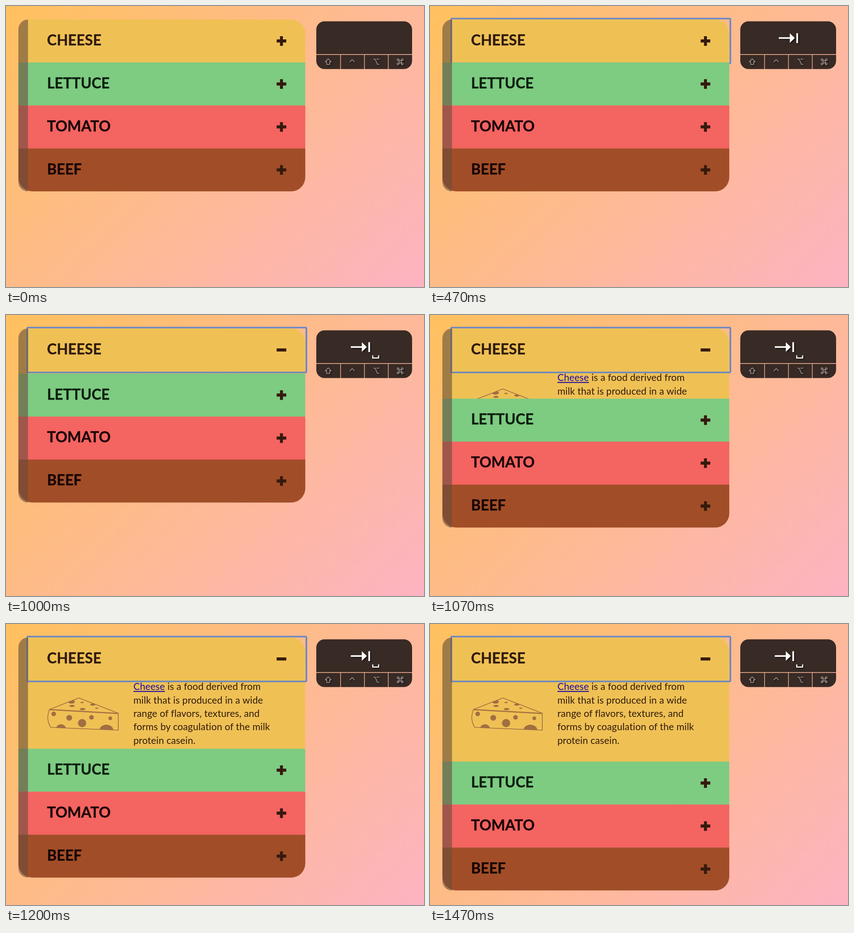
An HTML page that plays this animation: 912 px wide and 614 px high, repeating every 1540 ms.

```html
<!DOCTYPE html>
<html lang="en">
<head>
<meta charset="utf-8">
<style>
  html, body { margin: 0; width: 100%; height: 100%; overflow: hidden; }
  body { background: linear-gradient(135deg, #ffc15e, #fdb3c2); }
  svg { display: block; width: 912px; height: 614px; }
  text { font-family: Lato, "Open Sans", sans-serif; }
  .head { font-size: 32px; font-weight: 700; stroke-width: .4; stroke-linejoin: round; }
  .body { font-size: 21px; letter-spacing: .1px; fill: #331a0c; }
  .link { fill: #1d0aa3; text-decoration: underline; }
  .line { fill: none; stroke-linejoin: round; }
  .shade { filter: drop-shadow(2px 2px 1px #0009); }
</style>
</head>
<body>
<svg viewBox="0 0 912 614">
  <defs>
    <clipPath id="card"><rect id="cardBox" x="27" y="29.5" width="626" height="375.6" rx="31"/></clipPath>
    <clipPath id="pad"><rect x="677" y="33.5" width="209" height="104.3" rx="18"/></clipPath>
    <clipPath id="front"><path d="M95 187L245 196V232L98 226Q86 208 95 187Z"/></clipPath>
    <clipPath id="top"><path d="M94 187L159 161.5L245 195Z"/></clipPath>
  </defs>

  <g clip-path="url(#card)">
    <rect x="27" y="29" width="626" height="275" fill="#efc155"/>
    <g id="cheese"></g>
    <g id="panel">
      <g fill="#a06f42">
        <g clip-path="url(#top)">
          <ellipse cx="143" cy="170" rx="7.5" ry="4"/><ellipse cx="166" cy="171.5" rx="3.5" ry="1.4"/>
          <ellipse cx="189.5" cy="176" rx="5.5" ry="2.6"/><ellipse cx="144" cy="179" rx="6" ry="2.2"/>
          <ellipse cx="167" cy="186" rx="6" ry="2.5"/><ellipse cx="198" cy="184" rx="3.5" ry="1.3"/>
        </g>
        <g clip-path="url(#front)">
          <circle cx="104" cy="196.5" r="5"/><circle cx="138" cy="205" r="6.3"/><circle cx="166" cy="216.5" r="9"/>
          <circle cx="186.5" cy="204" r="5"/><circle cx="227.5" cy="206" r="4"/>
          <ellipse cx="120" cy="228" rx="10.5" ry="9"/><ellipse cx="219" cy="232" rx="15" ry="12"/>
        </g>
      </g>
      <g class="line" stroke="#a06f42" stroke-width="1.6">
        <path d="M94 187L159 161.5L245 195V232L98 226Q86 208 95 187"/>
        <path d="M94 187L245 195.5" stroke-width="2.6"/>
      </g>
      <g class="body">
        <text x="278" y="144.3"><tspan class="link">Cheese</tspan> is a food derived from</text>
        <text x="278" y="173.6">milk that is produced in a wide</text>
        <text x="278" y="202.9">range of flavors, textures, and</text>
        <text x="278" y="232.2">forms by coagulation of the milk</text>
        <text x="278" y="261.5">protein casein.</text>
      </g>
    </g>
  </g>

  <g id="ring" class="line" stroke="#5580d0">
    <rect x="46.5" y="27.5" width="608.8" height="98" rx="1.5" stroke-width="4.2" opacity=".45"/>
    <rect x="46.5" y="27.5" width="608.8" height="98" rx="1.5" stroke-width="2.6" opacity=".85"/>
  </g>

  <g clip-path="url(#card)"><g id="lower"></g></g>
  <path id="strip" fill="#6b4d3d" fill-opacity=".6"/>

  <g clip-path="url(#pad)" fill="#382a25">
    <path d="M677 33H886V105.3H677ZM677 106.8H729.3V138H677ZM730.6 106.8H781.4V138H730.6ZM782.7 106.8H833.4V138H782.7ZM834.7 106.8H886V138H834.7Z"/>
  </g>
  <g class="line shade" stroke="#a19894" stroke-width="1.6">
    <path d="M703 115.5L709.5 122H706.3V127.8H699.7V122H696.5Z"/>
    <path d="M750 122.5L755.3 117L760.6 122.5"/>
    <path d="M801.5 116.3H805.5L810.5 127.5H814.5M808.5 116.3H814.5"/>
    <path d="M857.5 119.5H862.5V124.5H857.5ZM857.5 119.5H855.7A2 2 0 1 1 857.5 117.7ZM862.5 119.5V117.7A2 2 0 1 1 864.3 119.5ZM862.5 124.5H864.3A2 2 0 1 1 862.5 126.3ZM857.5 124.5V126.3A2 2 0 1 1 855.7 124.5Z"/>
  </g>
  <g id="tab" class="shade" fill="#fff">
    <path d="M761 68.2H785V59.5L796 70L785 80.5V71.8H761ZM799.3 59.5H803V81H799.3Z"/>
  </g>
  <path id="space" class="line shade" stroke="#fff" stroke-width="2.4" style="stroke-linejoin:miter" d="M800.2 88.3V94H813V88.3"/>
</svg>

<script>
const $ = id => document.getElementById(id);
const ROW = 93.9, TOP = 29.5, OPEN = 177.2, LOOP = 1540;
// moments at which the screen refreshes
const ticks = [0, 270, 340, 400, 470, 930, 1000, 1070, 1130, 1200, 1270, 1330, 1400, 1470];

function row(i, name, fill, ink) {
  const y = TOP + i * ROW;
  return `<rect x="27" y="${y}" width="626" height="${ROW + .3}" fill="${fill}"/>
    <text class="head" x="89.5" y="${y + 56.5}" fill="${ink}" stroke="${ink}">${name}</text>
    <path fill="#351a0d" d="M590.5 ${y + 43.5}h21v6.8h-21z"/>
    <path class="bar" fill="#351a0d" d="M597.8 ${y + 36.5}h6.4v21h-6.4z"/>`;
}

$('cheese').innerHTML = row(0, 'CHEESE', '#efc155', '#2e1a0c');
$('lower').innerHTML = row(1, 'LETTUCE', '#7ecb82', '#0a1f0d')
  + row(2, 'TOMATO', '#f46461', '#1b0306')
  + row(3, 'BEEF', '#a14e28', '#170303');
const bar = $('cheese').querySelector('.bar');

// cubic-bezier(.25, .1, .25, 1)
function ease(x) {
  if (x <= 0) return 0;
  if (x >= 1) return 1;
  const curve = (a, b, u) => 3 * a * u * (1 - u) ** 2 + 3 * b * u * u * (1 - u) + u ** 3;
  let lo = 0, hi = 1;
  for (let i = 0; i < 24; i++) {
    const mid = (lo + hi) / 2;
    if (curve(.25, .25, mid) < x) lo = mid; else hi = mid;
  }
  return curve(.1, 1, lo);
}

const show = (el, on) => el.setAttribute('visibility', on ? 'visible' : 'hidden');

function draw(now) {
  const time = now % LOOP;
  const t = ticks.filter(k => k <= time).pop();
  const shift = OPEN * ease((t - 983) / 400);
  const height = 4 * ROW + shift;

  show($('tab'), t >= 270);
  show($('ring'), t >= 340);
  show($('space'), t >= 930);
  show(bar, t < 1000);
  show($('panel'), t >= 1000);
  $('tab').setAttribute('transform', `translate(${t >= 930 ? -8.7 : 0})`);
  $('lower').setAttribute('transform', `translate(0 ${shift})`);
  $('cardBox').setAttribute('height', height);
  $('strip').setAttribute('d',
    `M48 ${TOP}v${height}a21 21 0 0 1-21-21v${42 - height}a21 21 0 0 1 21-21z`);
  requestAnimationFrame(draw);
}
requestAnimationFrame(draw);
</script>
</body>
</html>
```
